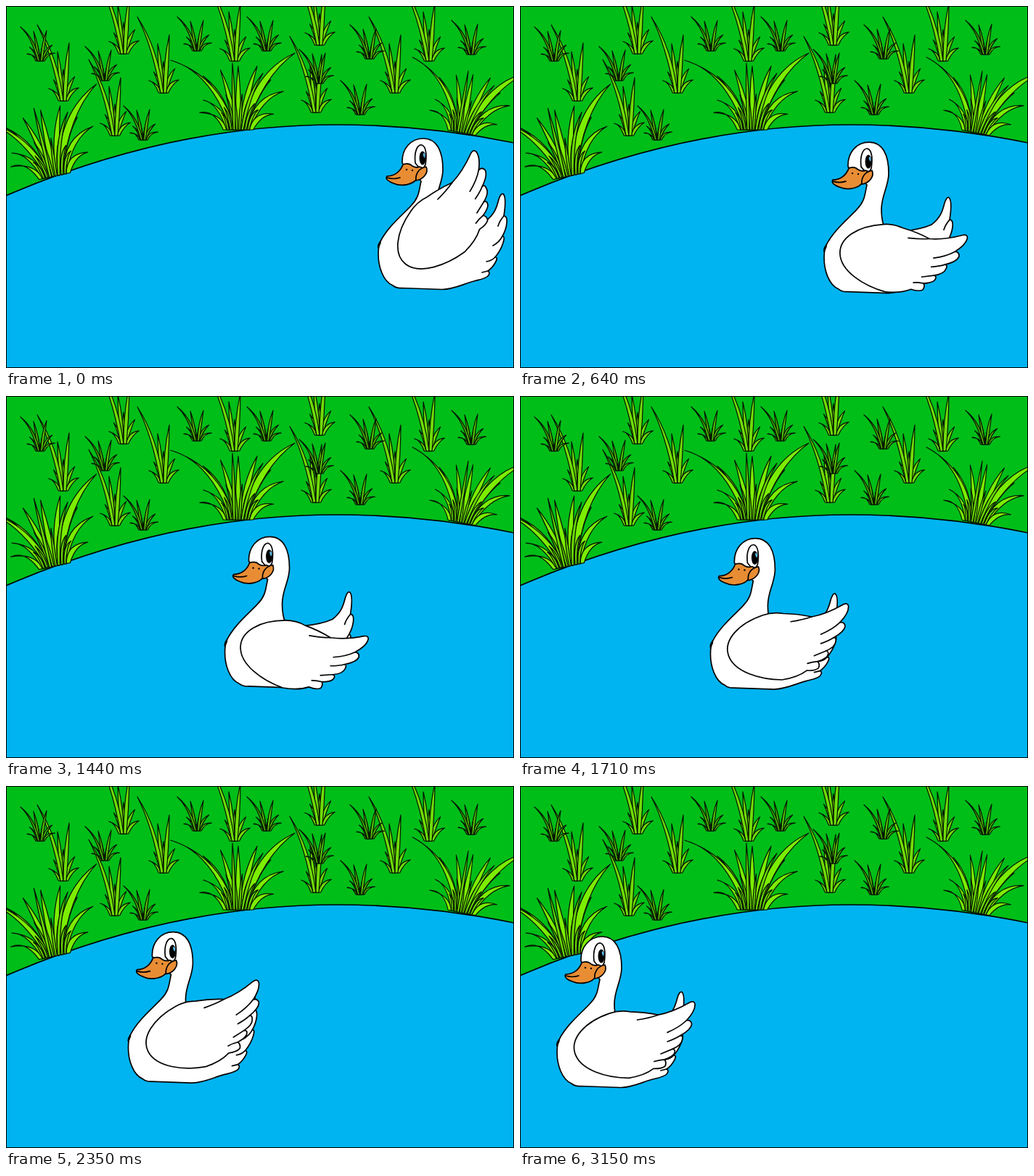
Recreate the animation shown at these times as an HTML page. Size 700 by 500 pixels, loop 3.2 s.

```html
<!DOCTYPE html>
<html lang="en">
<head>
<meta charset="utf-8">
<title>Swan on a pond</title>
<style>
  html, body { margin: 0; width: 100%; height: 100%; overflow: hidden; background: #00b4f1; }
  svg { display: block; width: 700px; height: 500px; }
  .ink { stroke: #000; stroke-width: 1.7; stroke-linecap: round; stroke-linejoin: round; }
  .grass path { stroke: #031500; stroke-width: 1.2; stroke-linejoin: round; }
</style>
</head>
<body>
<svg viewBox="0 0 700 500">
  <rect width="700" height="500" fill="#00b4f1"/>
  <path class="ink" fill="#00be18" d="M-4 264 L0 262 Q227 164 455 164 Q578 164 700 189 L704 190 V-4 H-4Z"/>
  <g id="grass" class="grass"></g>

  <g id="swan" class="ink" fill="none">
    <path fill="#fff" d="M546 217 C545 197 558 183 575 183 C594 183 602 201 602 226
      C602 244 592 256 592 276 Q592 288 595 298 Q609 300 623 306
      Q648 303 661 297 C673 288 676 279 679 267 Q682 258 685 259.500
      C689 263 688 277 686 290 Q691 290 690 300 Q689 309 684 318
      Q688 318 685 327 Q682 337 674 347 Q678 347 675 353 Q671 361 664 366
      Q668 368 664 373 C660 377 652 378 645 380 C630 384 618 391 601 391.500
      L545 389.500 Q538 390 533 386 C519 380 513 359 513 343 Q513 331 516 325
      C526 305 546 289 558 276 C570 264 569 254 572 242 Z"/>
    <path d="M516 325 Q512 330 513 334 L516 327 M686 290 Q680 297 678 304
      M684 318 Q680 326 671 331 M674 347 Q669 352 662 353 M664 366 L656 368"/>

    <path fill="#fff" d="M564 217 C562 201 567 191 573 192 C579 194 580 206 578 219 L573 228Z"/>
    <ellipse cx="574" cy="210" rx="4.500" ry="9.500" fill="#000" stroke="none"/>
    <path d="M575 203 Q579 204 577 210 Q574 207 575 203Z" fill="#56bdf0" stroke="none"/>
    <g fill="#e98d34">
      <path d="M525 235 C534 235 543 230 547 219 Q555 216 560 221
        Q565 224 570 222 L575 224 L567 237 C562 247 545 250 534 245 C528 243 522 239 525 235Z"/>
      <path d="M579 222 C583 231 574 240 565 241 C564 233 568 224 579 222Z"/>
    </g>
    <path d="M525 237 Q534 240 543 237"/>
    <g fill="#000" stroke="none"><circle cx="552" cy="226" r="1.200"/><circle cx="560" cy="227" r="1.200"/></g>

    <g id="wing">
      <path fill="#fff" d="M381 403 C353 393 322 371 323 346 C324 325 349 310 385 310
        C398 310 405 313 412 317 Q431 324 447 334 Q467 337 493 332
        Q500 331 499 337 Q496 346 481 354 Q487 355 486 361 Q483 368 466 371
        Q470 372 467 377 Q464 384 450 385 Q455 387 450 392 Q446 395 435 395
        Q437 400 433 404 Q427 406 417 402 Q402 407 381 403Z"/>
      <path d="M418 331 Q434 334 447 334 M451 361 Q468 360 481 354
        M447 373 Q458 373 466 371 M433 386 L450 385 M421 393 Q428 393 435 395"/>
    </g>
  </g>
  <rect x=".5" y=".5" width="699" height="499" fill="none" stroke="#000"/>
</svg>
<script>
  // A clump is a fan of short blades plus a few long ones given by their tips
  const bush = { n: 9, height: 88, spread: 66, foot: 18, width: 13, tips: [[-93, -96], [78, -106]] };
  const core = { n: 8, height: 50, spread: 45, foot: 14, width: 6, tips: [[-8, -92], [34, -78]] };
  const tall = { n: 5, height: 40, spread: 50, foot: 5, width: 8, tips: [[-8, -68], [-36, -105], [8, -80]] };
  const small = { n: 6, height: 31, spread: 62, foot: 5, width: 5, tips: [[-9, -41], [-27, -47], [9, -42]] };

  const noise = i => Math.abs(Math.sin(i * 12.9) * 43.7) % 1;

  // Blades rise from the foot and bend outward, more so the flatter they lie
  function blade(x, [tx, ty], width) {
    const h = width / 2, bend = .5 + .35 * Math.min(2, Math.abs(tx / ty));
    const cx = x + (tx - x) * .28, cy = ty * bend;
    return `<path d="M${x - h / 2} 0Q${cx - h} ${cy} ${tx} ${ty}Q${cx + h} ${cy + h} ${x + h / 2} 0Z"/>`;
  }

  function clump({ n, height, spread, foot, width, tips }, x, y, turn = 0, size = 1) {
    let out = "";
    for (let i = 0; i < n; i++) {
      const s = 2 * i / (n - 1) - 1, a = s * spread * Math.PI / 180;
      const len = height * (1 - .3 * s * s) * (.85 + .3 * noise(i + 1));
      out += blade(s * foot, [len * Math.sin(a), -len * Math.cos(a)], width * .8);
    }
    for (const tip of tips) out += blade(Math.sign(tip[0]) * foot * .4, tip, width);
    return `<g transform="translate(${x} ${y}) rotate(${turn}) scale(${size})">${out}</g>`;
  }

  const tallSpots = [[79, 131], [162, 66], [217, 120], [150, 179], [315, 76], [432, 54], [427, 147], [536, 120], [583, 76]];
  const smallSpots = [[47, 76], [136, 103], [189, 185], [263, 62], [359, 62], [431, 107], [488, 150], [501, 73], [641, 67]];
  const bushSpots = [[67, 235, -12, 1.06], [320, 171, 0, 1], [628, 175, 11, .93]];
  const grow = (kind, spots, fill) =>
    `<g fill="${fill}">${spots.map(spot => clump(kind, ...spot)).join("")}</g>`;

  document.getElementById("grass").innerHTML =
    grow(tall, tallSpots, "#70dc08") + grow(small, smallSpots, "#58c407") +
    grow(bush, bushSpots, "#7cee00") + grow(core, bushSpots, "#6ad806");

  const LOOP = 3200, BEAT = 160, LONG = 110;
  const UP = 55, DOWN = -15.5, FALL = 9, FLAP = 20;
  const mix = (a, b, p) => a + (b - a) * p;

  // Degrees of wing lift: one full flap, a second fall, a quick recovery, then a slow fold
  function liftAt(u) {
    const last = FLAP + FALL;
    if (u > last) return Math.min(DOWN + 11.5 * (u - last), mix(36.5, 18.5, (u - 33) / 27));
    const p = u % FLAP;
    return p < FALL ? mix(UP, DOWN, p / FALL) : mix(DOWN, UP, (p - FALL) / (FLAP - FALL));
  }

  const swan = document.getElementById("swan");
  const wing = document.getElementById("wing");
  const start = performance.now();

  function draw(now) {
    const t = Math.max(0, now - start) % LOOP;
    // Each beat advances two steps, then one
    const u = 3 * Math.floor(t / BEAT) + (t % BEAT >= LONG ? 2 : 0);
    const lift = liftAt(u), reach = 1 + Math.max(0, lift) / 1400;
    swan.setAttribute("transform", `translate(${-7.83 * u} ${.424 * u})`);
    wing.setAttribute("transform",
      `translate(563 329) rotate(${-lift}) scale(${reach} 1) translate(-351.5 -340.4)`);
    requestAnimationFrame(draw);
  }
  draw(start);
</script>
</body>
</html>
```
